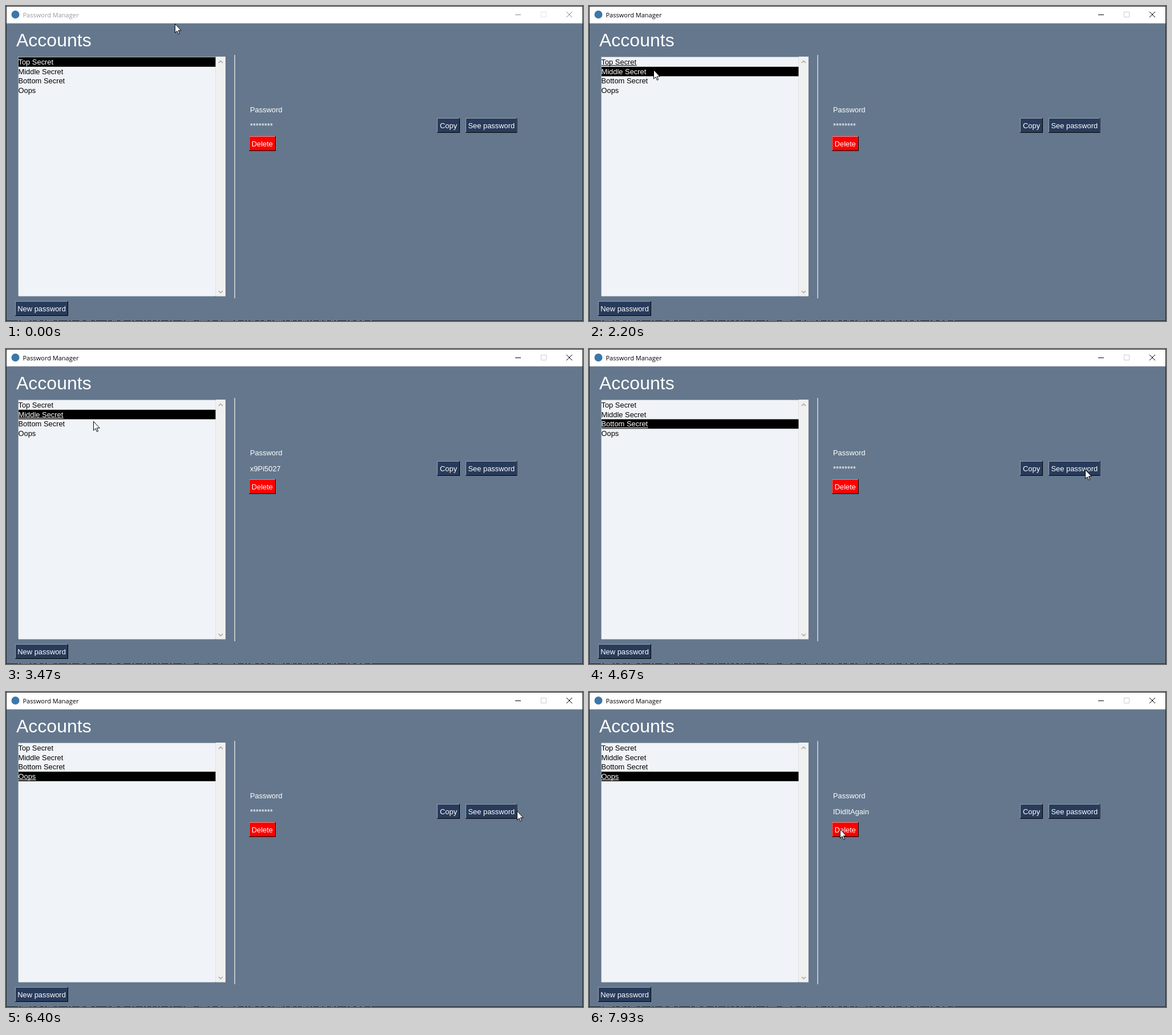
Recreate the animation shown at these times as an HTML page with a canvas. Size 1012x554 px, loop 8 s.

```html
<!DOCTYPE html>
<html lang="en">
<head>
<meta charset="utf-8">
<title>Password Manager</title>
<style>
  html, body { margin: 0; width: 100%; height: 100%; overflow: hidden; background: #64778d; }
  canvas, svg { position: absolute; left: 0; top: 0; width: 1012px; height: 554px; }
  text { font: 12.9px "Liberation Sans", Arial, sans-serif; fill: #fff; white-space: pre; }
  #heading { font-size: 32px; }
  #title { font: 11px "Open Sans", "Noto Sans", sans-serif; }
</style>
</head>
<body>
<canvas id="stage" width="1012" height="554"></canvas>
<svg id="layer" viewBox="0 0 1012 554">
  <text id="title" x="29.5" y="20">Password Manager</text>
  <text id="heading" x="18" y="71">Accounts</text>
  <text x="428" y="186.5">Password</text>
  <text id="value" x="428" y="215"></text>
  <text x="430.7" y="247">Delete</text>
  <text x="761" y="215">Copy</text>
  <text id="see" x="810.5" y="215">See password</text>
  <text x="20.3" y="537">New password</text>
  <path id="cursor" d="M.5 .5V16.2L4 12.8L6.4 18.4L8.6 17.5L6.3 12H11.3Z" fill="#fff" stroke="#000"/>
</svg>
<script>
const LOOP = 8000, FPS = 15, STEP = 70;
const ROW_Y = 90.2, ROW_H = 16.66;
const ctx = document.getElementById('stage').getContext('2d');
const layer = document.getElementById('layer');
const el = id => document.getElementById(id);
const cursor = el('cursor'), title = el('title'), value = el('value'), see = el('see');

// pick: list click; press and show: "See password" held down and let go
const accounts = [
  { name: 'Top Secret', password: 'TY74y62mMoreLetters', pick: 200, press: 800, show: 870 },
  { name: 'Middle Secret', password: 'x9Pi5027', pick: 2200, press: 2870, show: 2930 },
  { name: 'Bottom Secret', password: 'Kw82nLq4', pick: 4000, press: 4730, show: 4800 },
  { name: 'Oops', password: 'IDidItAgain', pick: 5930, press: 6670, show: 6800 }
];

// Pointer strokes; over is how far the hand shoots past the goal
const home = { x: 296, y: 31 };
const strokes = [
  { from: 0, to: 200, x: 95, y: 99 },
  { from: 270, to: 740, x: 863, y: 211 },
  { from: 870, to: 1730, x: 113, y: 112, over: 1 },
  { from: 2200, to: 2730, x: 860, y: 213 },
  { from: 2930, to: 3470, x: 153, y: 127 },
  { from: 3600, to: 3800, x: 139, y: 130 },
  { from: 4070, to: 4670, x: 870, y: 212, over: 0.8 },
  { from: 5070, to: 5730, x: 165, y: 145 },
  { from: 5930, to: 6600, x: 871, y: 212, over: 1 },
  { from: 7070, to: 7600, x: 500, y: 271 },
  { from: 7600, to: 7930, x: 440, y: 241 }
];

const rows = accounts.map((account, i) => {
  const t = document.createElementNS('http://www.w3.org/2000/svg', 'text');
  t.setAttribute('x', 21.5);
  t.setAttribute('y', ROW_Y + i * ROW_H + 12.7);
  t.textContent = account.name;
  layer.insertBefore(t, cursor);
  return t;
});

function backOut(u, over) {
  const v = u ** 1.3 - 1;
  return 1 + (over + 1) * v ** 3 + over * v ** 2;
}

function pointerAt(t) {
  let { x, y } = home;
  for (const s of strokes) {
    if (t <= s.from) break;
    const u = Math.min(1, (t - s.from) / (s.to - s.from));
    x += (s.x - x) * backOut(u, s.over || 0);
    y += (s.y - y) * backOut(u, 0);
  }
  return [Math.round(x), Math.round(y)];
}

function stateAt(t) {
  const last = accounts.filter(a => a.pick <= t).length - 1;
  const selected = Math.max(0, last);
  const a = accounts[selected];
  return {
    selected,
    focus: last >= 0,
    active: t >= a.pick + STEP ? selected : selected - 1,
    pressed: t >= a.press && t < a.show,
    value: t >= a.show ? a.password : '********'
  };
}

function rect(color, x, y, w, h) {
  ctx.fillStyle = color;
  ctx.fillRect(x, y, w, h);
}

function line(color, width, ...pts) {
  ctx.strokeStyle = color;
  ctx.lineWidth = width;
  ctx.beginPath();
  pts.forEach(([x, y]) => ctx.lineTo(x, y));
  ctx.stroke();
}

function chevron(y, dir) {
  line('#a3a3a3', 1.5, [373, y + 2 * dir], [376.5, y - 1.5 * dir], [380, y + 2 * dir]);
}

function button(x, y, w, h, face, light, sunken) {
  rect(sunken ? light : '#000', x, y, w, h);
  rect(sunken ? '#000' : light, x, y, w - 1, h - 1);
  rect(face, x + 1, y + 1, w - 2, h - 2);
}

function drawWindow(focus) {
  const ink = focus ? '#000' : '#888';
  rect('#20252b', 0, 0, 1012, 554);
  rect('#64778d', 1, 30, 1010, 523);
  rect('#fff', 1, 1, 1010, 29.5);
  // Text of a page behind, cut off by the lower edge
  for (let x = 12; x < 640; x += 3) {
    if (Math.sin(x * x) > 0) rect('#8a8f94', x, 553, 2, 1);
  }
  ctx.fillStyle = '#3b77a8';
  ctx.beginPath();
  ctx.arc(16.5, 15, 7, 0, 7);
  ctx.fill();
  rect(ink, 893, 15, 10, 1);
  line(focus ? '#ccc' : '#e4e4e4', 1,
    [938.5, 10.5], [947.5, 10.5], [947.5, 19.5], [938.5, 19.5], [938.5, 10]);
  line(ink, 1, [983, 10], [993, 20]);
  line(ink, 1, [993, 10], [983, 20]);
  title.style.fill = focus ? '#000' : '#999';
}

function drawList(s) {
  rect('#a0a5ab', 21, 89, 364, 421);
  rect('#f0f3f7', 22, 90, 345, 420.5);
  rect('#e3e3e3', 367, 90, 1, 420);
  rect('#f0f0f0', 368, 89, 17, 421.5);
  chevron(98, 1);
  chevron(503, -1);
  rows.forEach((row, i) => {
    const top = ROW_Y + i * ROW_H, on = i === s.selected;
    const ink = on ? '#fff' : '#000';
    if (on) rect('#000', 22, top, 345.5, ROW_H);
    if (i === s.active) rect(ink, 22, Math.round(top) + 14, row.getComputedTextLength(), 1);
    row.style.fill = ink;
  });
}

function draw(t) {
  const s = stateAt(t);
  drawWindow(s.focus);
  drawList(s);
  rect('#fff', 400.6, 86, 1.1, 428);

  const navy = ['#283b5b', '#939dad'];
  button(756, 197, 40, 26, ...navy);
  button(806, 197, 90.5, 26, ...navy, s.pressed);
  button(16, 519, 93, 26, ...navy);
  button(426.4, 229, 46.6, 26, '#f00', '#ff8080');

  see.setAttribute('transform', s.pressed ? 'translate(1 1)' : '');
  if (value.textContent !== s.value) value.textContent = s.value;
  cursor.setAttribute('transform', `translate(${pointerAt(t)})`);
}

const stepTime = k => Math.round(k * 100 / FPS) * 10;
function snap(t) {
  let k = Math.floor(t * FPS / 1000) + 1;
  while (stepTime(k) > t) k--;
  return stepTime(k);
}

function tick(now) {
  draw(snap(now % LOOP));
  requestAnimationFrame(tick);
}
draw(0);
requestAnimationFrame(tick);
</script>
</body>
</html>
```
